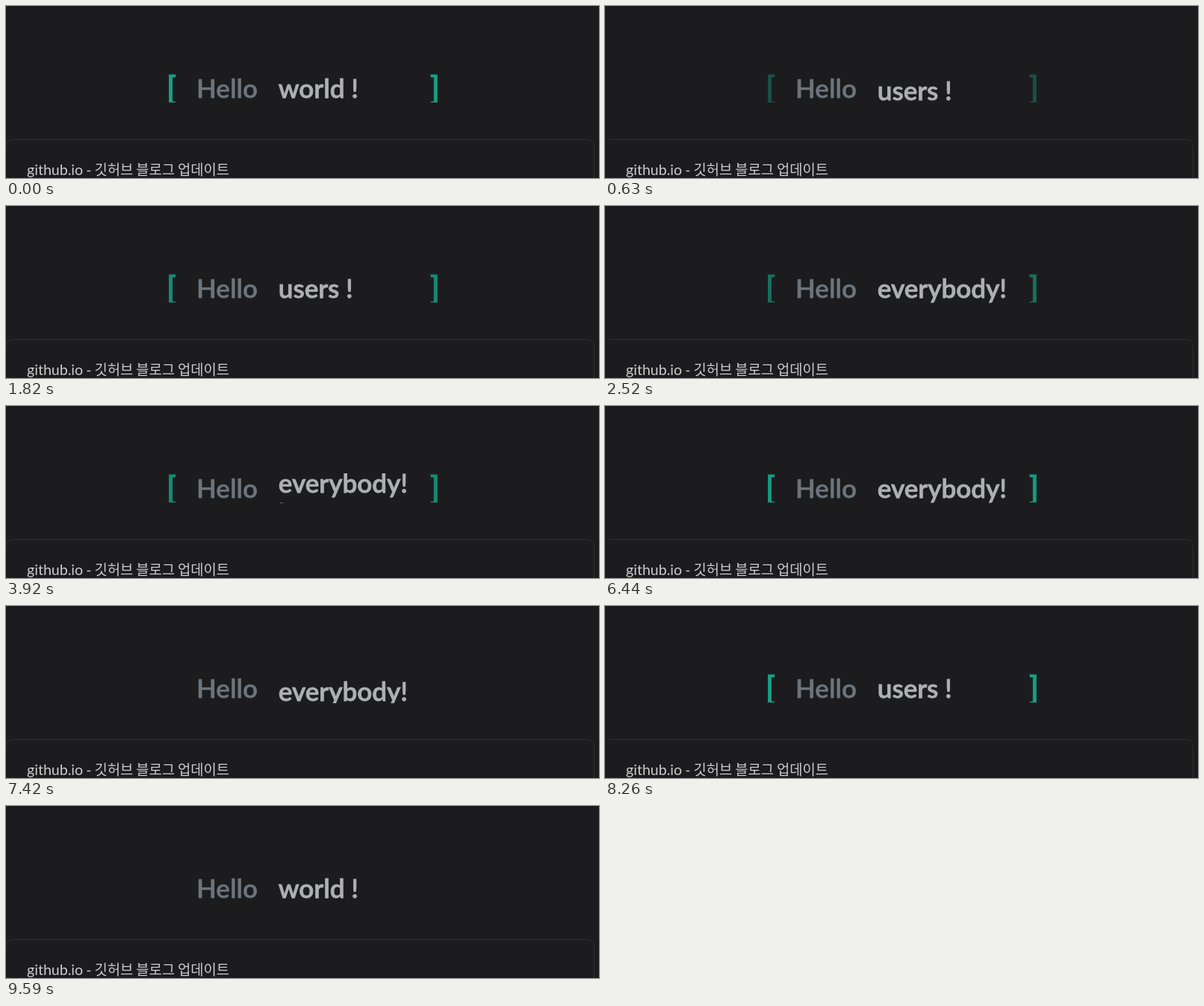
An HTML page for the animation above (9.66 s loop, 794 px wide and 230 px high).

```html
<!DOCTYPE html>
<html lang="ko">
<head>
<meta charset="utf-8">
<title>Hello</title>
<style>
  html, body { margin: 0; width: 100%; height: 100%; overflow: hidden; background: #1c1c1e; }
  svg { display: block; font-family: Lato, "Noto Sans CJK KR", "Noto Sans CJK", sans-serif; }
  .headline { font-size: 35px; font-weight: 600; }
  .hello { fill: #6c757d; stroke: #6c757d; stroke-width: 0.5px; }
  .words { fill: #afb0b1; stroke: #afb0b1; stroke-width: 0.8px; }
  .brackets { font-size: 42px; font-weight: 600; fill: #16a085; stroke: #16a085; stroke-width: 1.1px; }
  .card { fill: #1c1c1e; stroke: #2f2f32; }
  .title { font-size: 19.6px; word-spacing: -1px; fill: #ccc; }
  .ko { font-size: 18.75px; font-family: "Noto Sans CJK KR", "Noto Sans CJK", sans-serif; }
</style>
</head>
<body>
<svg width="794" height="230" viewBox="0 0 794 230">
  <defs>
    <clipPath id="wordWindow"><rect x="214" y="90" width="368" height="40"/></clipPath>
    <clipPath id="bracketWindow"><rect x="214" y="89" width="368" height="40"/></clipPath>
  </defs>
  <rect class="card" x="-0.5" y="178.5" width="788" height="90" rx="9"/>
  <text class="title" x="28" y="226">github.io - <tspan class="ko">깃허브</tspan> <tspan class="ko">블로그</tspan> <tspan class="ko">업데이트</tspan></text>
  <g clip-path="url(#bracketWindow)">
    <g class="brackets" id="brackets">
      <text x="215" y="125">[</text>
      <text x="580.7" y="125" text-anchor="end">]</text>
    </g>
  </g>
  <text class="headline hello" x="255" y="122.6">Hello</text>
  <g clip-path="url(#wordWindow)">
    <g class="headline words" id="words">
      <text x="364.8" y="122.6">world !</text>
      <text x="364.8" y="162.6">users !</text>
      <text x="364.8" y="202.6">everybody!</text>
      <text x="364.8" y="242.6">lurno_gs !</text>
    </g>
  </g>
</svg>
<script>
  const LOOP = 9660, TICK = 70, LINE = 40;
  const SCROLL = { first: 355, gap: 1754, duration: 421, directions: [1, 1, 1, -1, -1, -1] };
  const BLINK = { period: 2100, peak: -20, cutoff: 0.26, gain: 1.2, offset: -0.06 };

  const words = document.getElementById('words');
  const brackets = document.getElementById('brackets');

  const clamp = v => Math.min(1, Math.max(0, v));
  const bezier = (s, a, b) => 3 * s * (1 - s) ** 2 * a + 3 * s * s * (1 - s) * b + s ** 3;

  // CSS "ease": cubic-bezier(.25, .1, .25, 1)
  function ease(x) {
    if (x <= 0 || x >= 1) return clamp(x);
    let low = 0, high = 1;
    for (let i = 0; i < 24; i++) {
      const mid = (low + high) / 2;
      if (bezier(mid, 0.25, 0.25) < x) low = mid; else high = mid;
    }
    return bezier(low, 0.1, 1);
  }

  function line(t) {
    return SCROLL.directions.reduce((sum, direction, i) => {
      const start = SCROLL.first + i * SCROLL.gap;
      return sum + direction * ease((t - start) / SCROLL.duration);
    }, 0);
  }

  function glow(t) {
    const phase = (t - BLINK.peak) / BLINK.period % 1;
    const level = Math.abs(1 - 2 * phase);
    return level < BLINK.cutoff ? 0 : clamp(level * BLINK.gain + BLINK.offset);
  }

  function draw(time) {
    const t = Math.floor(time % LOOP / TICK) * TICK;
    words.setAttribute('transform', `translate(0 ${-LINE * line(t)})`);
    brackets.setAttribute('opacity', glow(t));
  }

  const begin = performance.now();
  function frame() {
    draw(performance.now() - begin);
    requestAnimationFrame(frame);
  }
  draw(0);
  requestAnimationFrame(frame);
</script>
</body>
</html>
```
